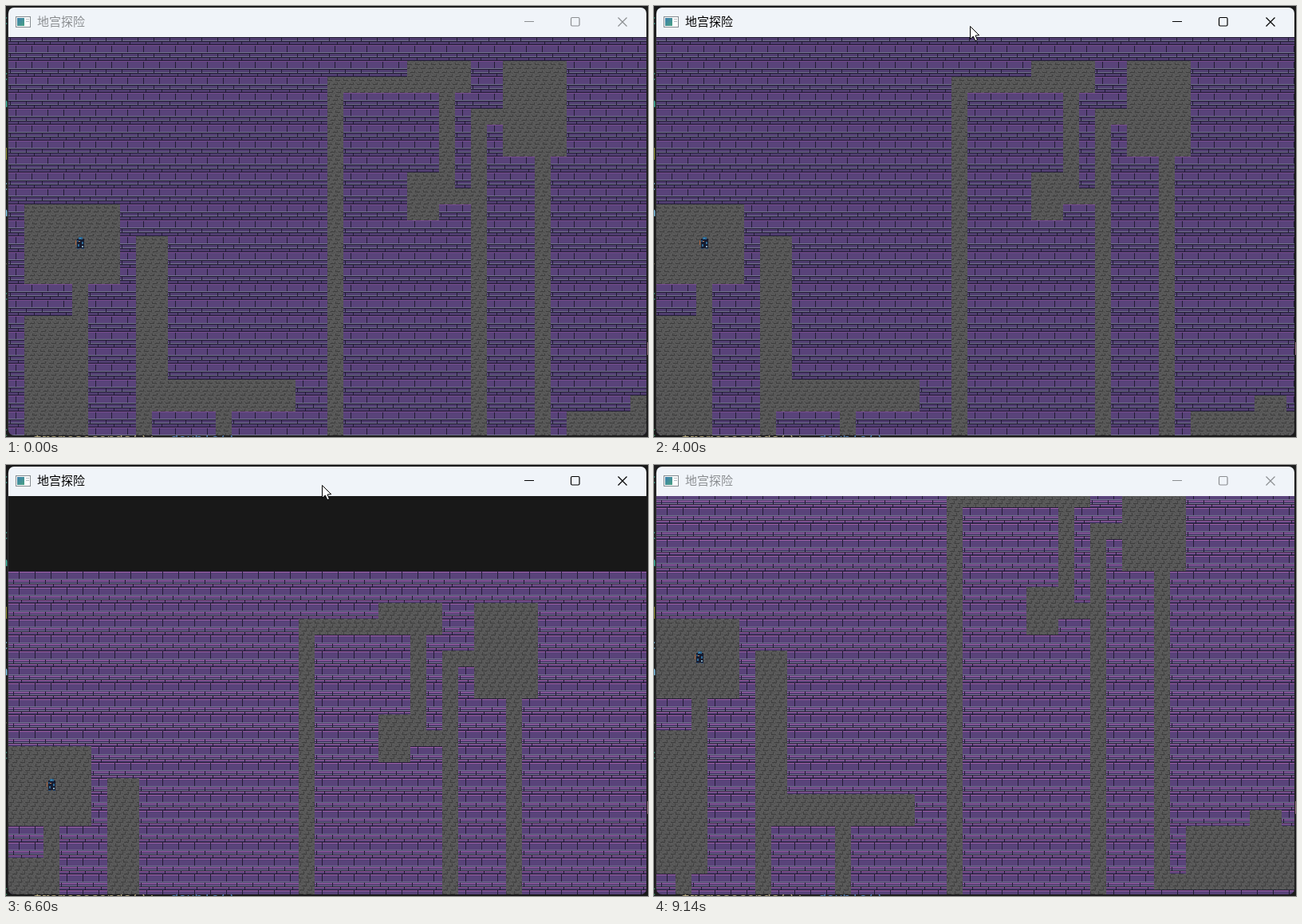
An HTML page with a canvas for the animation above (9.2 s loop, 805 by 541 pixels).

```html
<!DOCTYPE html>
<html lang="zh">
<head>
<meta charset="utf-8">
<style>
html, body { margin: 0; width: 100%; height: 100%; overflow: hidden; background: #1b1b1b; }
canvas { display: block; }
</style>
</head>
<body>
<canvas id="stage" width="805" height="541"></canvas>
<script>
const ctx = document.getElementById('stage').getContext('2d');
const LOOP = 9200, TILE = 20, COLS = 46, ROWS = 30;
const VIEW = { x: 3, y: 39, w: 800, h: 500 };

// Floor areas in tiles: x, y, width, height
const AREAS = [
  [1, 11, 6, 5], [4, 16, 1, 2], [1, 18, 4, 9], [3, 27, 1, 3],
  [8, 13, 2, 9], [8, 22, 10, 2], [8, 24, 1, 6], [13, 24, 1, 6],
  [20, 3, 1, 27], [20, 3, 5, 1], [25, 2, 4, 2], [27, 4, 1, 7],
  [25, 9, 2, 3], [28, 10, 1, 1], [29, 5, 1, 25], [29, 5, 2, 1],
  [31, 2, 4, 6], [33, 8, 1, 20], [33, 27, 3, 1], [35, 24, 9, 4], [39, 23, 2, 1]
];

// Camera moves: start, last step, steps, axis, first step, step, end
const MOVES = [
  [2370, 2440, 2, 'x', -5, -5, -7],
  [2700, 2770, 2, 'x', -5, -5, -17],
  [2910, 2970, 2, 'x', -5, -5, -27],
  [3120, 3460, 6, 'x', -5, -9, -77],
  [3730, 4470, 12, 'x', 10, 10, 40.4],
  [4730, 5540, 13, 'y', 10.8, 10, 156.4],
  [5740, 6200, 8, 'x', -2.4, -10, -33],
  [6460, 7670, 19, 'y', -2.8, -10, -26.4]
];

function rect(c, x, y, w, h) {
  ctx.fillStyle = c;
  ctx.fillRect(x, y, w, h);
}

function line(c, w, ...pts) {
  ctx.strokeStyle = c;
  ctx.lineWidth = w;
  ctx.beginPath();
  for (let i = 0; i < pts.length; i += 4) {
    ctx.moveTo(pts[i], pts[i + 1]);
    ctx.lineTo(pts[i + 2], pts[i + 3]);
  }
  ctx.stroke();
}

// Number of steps done, 0 before the start
function stepAt(t, t0, t1, n) {
  if (t < t0) return 0;
  return Math.min(n, Math.floor((t - t0) / ((t1 - t0) / (n - 1)) + 0.1) + 1);
}

function cameraAt(t) {
  const cam = { x: 3, y: 29 };
  for (const [t0, t1, n, axis, first, step, end] of MOVES) {
    const k = stepAt(t, t0, t1, n);
    if (k === n) cam[axis] = end;
    else if (k) cam[axis] += first + (k - 1) * step;
  }
  return cam;
}

// Textures are 32 x 32 texels, sampled down to 20 px:
// one tall course of bricks over two short ones
function wall(u, v) {
  const dark = '#211c33', body = '#59437a', pink = '#a262ab', grey = '#73748f';
  if (v < 16) {
    if (v === 15) return grey;
    if (u === 15 && v > 0) return dark;
    return v === 0 ? '#794d91' : v === 1 ? pink : body;
  }
  if (v === 16 || v === 24 || v === 25 || v === 31) return dark;
  const joint = v < 24 ? 3 : 19;
  if (u === joint || u === joint + 1) return dark;
  if (v === 23) return grey;
  return v === 19 || v === 27 ? pink : '#503d70';
}

function stone(u, v) {
  const row = v >> 3, a = (u + row * 5) % 16, b = v % 8;
  if (b === 7 && a < 9) return '#3c3c3c';
  if ((a === 0 || a === 9) && b > 2) return '#404040';
  return (u * 7 + v * 11) % 13 < 3 ? '#505050' : '#5a5a5a';
}

const cache = {};
function tile(kind, fx, fy) {
  const key = kind.name + fx.toFixed(1) + fy.toFixed(1);
  if (cache[key]) return cache[key];
  const c = document.createElement('canvas');
  c.width = c.height = TILE;
  const g = c.getContext('2d');
  const texel = (i, f) => (Math.floor((i + 0.5 - f) * 1.6 + 0.001) + 32) % 32;
  for (let y = 0; y < TILE; y++)
    for (let x = 0; x < TILE; x++) {
      g.fillStyle = kind(texel(x, fx), texel(y, fy));
      g.fillRect(x, y, 1, 1);
    }
  return cache[key] = c;
}

function drawHero(x, y) {
  const parts = [
    ['#171b2e', 6, 3, 9, 12], ['#2a648f', 8, 1, 5, 3], ['#4593bd', 9, 2, 2, 1],
    ['#26507a', 6, 5, 2, 2], ['#a0603f', 4, 5, 1, 6], ['#b98765', 8, 6, 2, 1],
    ['#2d6a96', 12, 7, 2, 3], ['#2d6a96', 7, 10, 2, 3], ['#7fa4b8', 12, 12, 2, 2],
    ['#27486f', 6, 15, 3, 1], ['#27486f', 12, 15, 3, 1]
  ];
  for (const [c, dx, dy, w, h] of parts) rect(c, x + dx, y + dy, w, h);
}

function drawMap(cam) {
  const x = Math.floor(cam.x + 0.01), y = Math.floor(cam.y + 0.01);
  const fx = Math.abs(cam.x - x), fy = Math.abs(cam.y - y);
  const brick = tile(wall, fx, fy), floor = tile(stone, fx, fy);
  const fill = (img, cx, cy, w, h) => {
    for (let j = cy; j < cy + h; j++)
      for (let i = cx; i < cx + w; i++) ctx.drawImage(img, x + i * TILE, y + j * TILE);
  };
  ctx.save();
  ctx.beginPath();
  ctx.rect(VIEW.x, VIEW.y, VIEW.w, VIEW.h);
  ctx.clip();
  fill(brick, 0, 0, COLS, ROWS);
  for (const a of AREAS) fill(floor, ...a);
  drawHero(x + 80, y + 260);
  ctx.restore();
}

// Code editor peeking out around the window
function drawDesktop(active) {
  rect(active ? '#191919' : '#1d1d1d', 0, 0, 805, 541);
  const marks = [
    ['#3fb79f', 23, 'c'], ['#3fb79f', 93, 'c'], ['#3fb79f', 127, 'a'],
    ['#7fc4e8', 231, 'c'], ['#7fc4e8', 264, 'a'], ['#c9b98c', 328, '-'],
    ['#3fa58c', 369, 'c'], ['#cccccc', 405, '.'], ['#cccccc', 439, '.'], ['#3fa56c', 540, 'c']
  ];
  ctx.font = '17px "Noto Sans Mono", monospace';
  ctx.textBaseline = 'alphabetic';
  ctx.textAlign = 'right';
  for (const [c, y, s] of marks) {
    ctx.fillStyle = c;
    ctx.fillText(s, 3, y);
  }
  rect('#8f8f30', 0, 178, 1, 15);
  ctx.textAlign = 'left';
  ctx.fillStyle = '#b3a67c';
  ctx.fillText('  .frameseconds();', 4, 549);
  ctx.fillStyle = '#4f82b8';
  ctx.fillText('double()', 206, 549);
  rect('#8c6878', 804, 422, 1, 16);
  rect('#333333', 2, 10, 1, 522);
}

function drawTitle(active) {
  const ink = active ? '#000000' : '#8b8e91';
  rect('#f0f4f9', 3, 2, 800, 37);
  rect('#858b90', 12, 13, 19, 14);
  rect('#ffffff', 13, 14, 17, 12);
  const g = ctx.createLinearGradient(14, 15, 23, 25);
  g.addColorStop(0, '#3d7fae');
  g.addColorStop(1, '#4aa283');
  rect(g, 14, 15, 9, 10);
  rect('#b9c0c4', 25, 16, 4, 1);
  rect('#b9c0c4', 25, 19, 4, 1);
  ctx.fillStyle = ink;
  ctx.font = '15px "Noto Sans CJK SC", "Noto Sans CJK", sans-serif';
  ctx.fillText('地宫探险', 39, 25);
  line(ink, 1, 650, 19.5, 662, 19.5);
  ctx.lineWidth = 1.2;
  ctx.beginPath();
  ctx.roundRect(708.5, 14.5, 10.5, 10.5, 1.5);
  ctx.stroke();
  line(ink, 1.2, 767.5, 14.5, 778.5, 25.5, 778.5, 14.5, 767.5, 25.5);
}

const REST = { x: 396, y: 25 };
function cursorAt(t) {
  if (t < 70) return null;
  if (t < 8410) {
    const p = 1 - stepAt(t, 70, 810, 12) / 12, q = p * p;
    return { x: Math.round(REST.x + 204 * q), y: Math.round(REST.y + 515 * q) };
  }
  const k = stepAt(t, 8410, 8800, 7);
  if (k === 7) return null;
  const p = Math.pow(k / 6, 1.5);
  return { x: Math.round(REST.x + 201 * p), y: Math.round(REST.y + 478 * p) };
}

function drawCursor(p, click) {
  if (click) {
    ctx.fillStyle = 'rgba(255,255,0,0.47)';
    ctx.beginPath();
    ctx.arc(p.x, p.y, 15, 0, 7);
    ctx.fill();
  }
  ctx.save();
  ctx.translate(p.x + 0.5, p.y + 0.5);
  ctx.beginPath();
  for (const [x, y] of [[0, 0], [0, 16], [3.8, 12.6], [6.4, 18.2], [9, 17], [6.5, 11.6], [11.2, 11.2]])
    ctx.lineTo(x, y);
  ctx.closePath();
  ctx.fillStyle = '#ffffff';
  ctx.strokeStyle = '#000000';
  ctx.lineWidth = 1;
  ctx.fill();
  ctx.stroke();
  ctx.restore();
}

function draw(t) {
  const active = t >= 880 && t < 9140;
  drawDesktop(active);
  ctx.save();
  ctx.beginPath();
  ctx.roundRect(3, 2, 800, 537, 7);
  ctx.clip();
  rect('#181818', 3, 2, 800, 537);
  drawMap(cameraAt(t));
  drawTitle(active);
  ctx.restore();
  const p = cursorAt(t);
  const click = (t >= 880 && t < 950) || (t >= 1090 && t < 1160);
  if (p) drawCursor(p, click);
}

const start = performance.now();
function tick(now) {
  draw(Math.max(0, now - start) % LOOP);
  requestAnimationFrame(tick);
}
draw(0);
requestAnimationFrame(tick);
</script>
</body>
</html>
```
